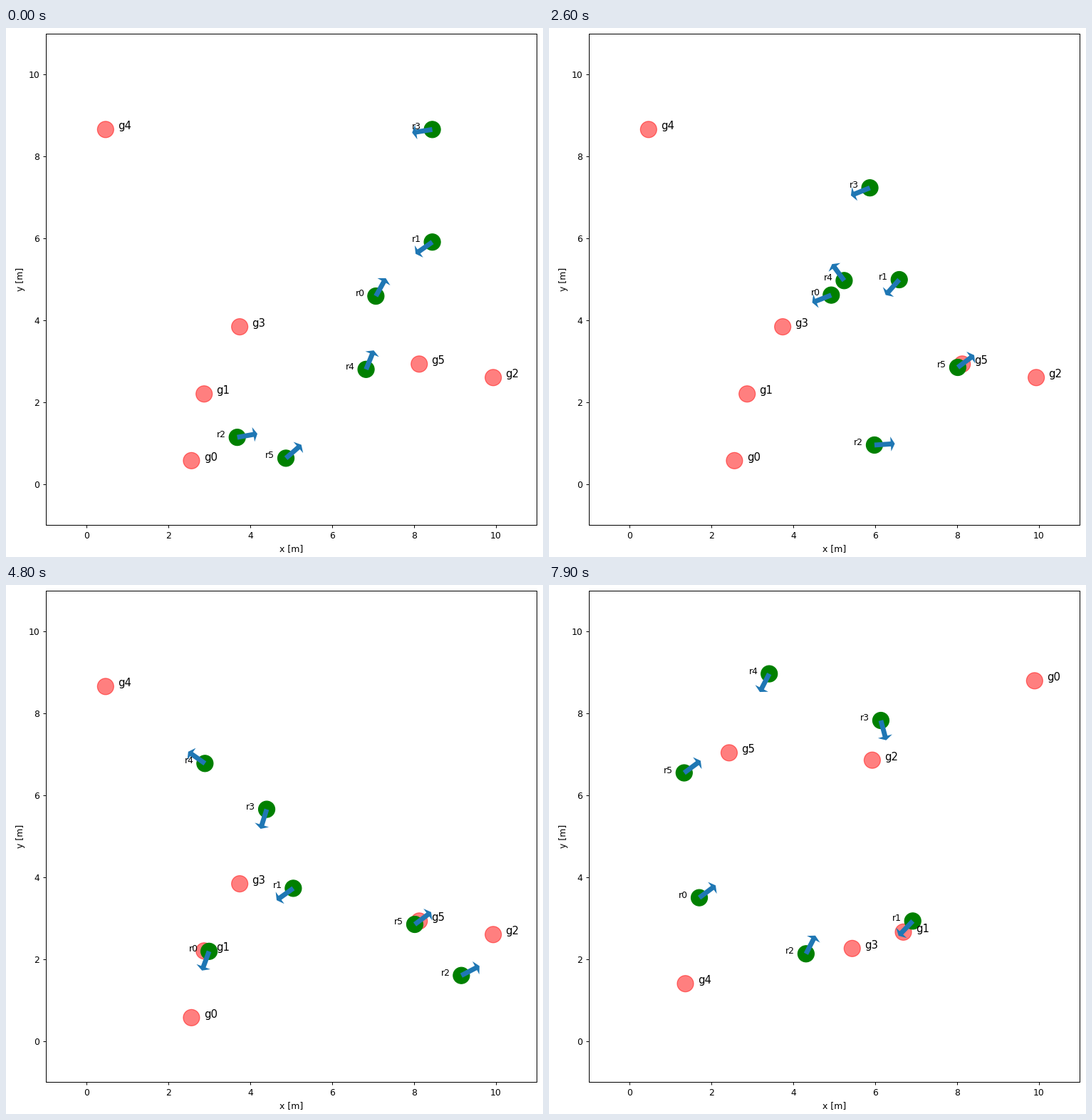
A matplotlib script for the animation above (8000 ms loop, 754 px wide and 742 px high).

```python
import numpy as np
import matplotlib.pyplot as plt
from matplotlib.animation import FuncAnimation
from matplotlib.patches import Circle, Polygon

FRAMES, RESET = 80, 69
STEP, REACH, RADIUS = 0.15, 0.2, 0.2    # metres per frame, metres, metres
W, H, DPI = 754, 742, 100
S = 0.895                               # scale of all point sizes

# Per robot: goal, first heading in degrees, then the points it passes
# at the scene's key times. From the last point it cruises to its goal.
TIMES_A = (0, 18, 35, 48, 57)
SCENE_A = [
    ((2.56, 0.57), 61, (7.07, 4.59), (5.89, 4.9), (3.83, 3.95), (2.99, 2.19)),
    ((2.87, 2.2), 215, (8.45, 5.91), (7, 5.35), (6.13, 4.52), (5.05, 3.73)),
    ((9.94, 2.6), 10, (3.68, 1.14), (4.99, 0.92), (7.27, 1.1), (9.16, 1.6),
     (10.14, 2.45)),
    ((3.74, 3.84), 189, (8.45, 8.66), (6.71, 7.6), (5.03, 6.77), (4.4, 5.66),
     (4.22, 4.45)),
    ((0.46, 8.66), 68, (6.83, 2.8), (5.74, 4.28), (4.54, 5.74), (2.89, 6.78)),
    ((8.13, 2.93), 41, (4.87, 0.63), (7.06, 2.13)),
]
TIMES_B = (70, 79)
SCENE_B = [
    ((9.9, 8.8), 45, (1.13, 2.95), (1.7, 3.5)),
    ((6.69, 2.66), 225, (7.84, 3.77), (6.92, 2.93)),
    ((5.93, 6.86), 45, (3.54, 1.05), (4.31, 2.13)),
    ((5.44, 2.26), -45, (5.33, 8.89), (6.14, 7.83)),
    ((1.36, 1.4), 225, (4.17, 9.82), (3.41, 8.97)),
    ((2.43, 7.04), 45, (0.45, 5.54), (1.33, 6.55)),
]


def unit(v):
    return v / np.hypot(*v)


def track(times, goal, heading, *points):
    """Return pose(t) -> position, direction on a smooth path to the goal."""
    p = np.array(points)
    t = np.array(times[:len(p)], float)
    to_goal = np.array(goal) - p[-1]
    steps = np.ceil((np.hypot(*to_goal) - REACH) / STEP)
    p = np.vstack([p, p[-1] + unit(to_goal) * steps * STEP])
    t = np.append(t, t[-1] + steps)

    chord = np.diff(p, axis=0) / np.diff(t)[:, None]
    a = np.radians(heading)
    start = np.hypot(*chord[0]) * np.array([np.cos(a), np.sin(a)])
    vel = np.vstack([start, (chord[:-1] + chord[1:]) / 2, chord[-1]])

    def pose(now):
        if now <= t[0]:
            return p[0] + vel[0] * (now - t[0]), unit(vel[0])
        now = min(now, t[-1])
        i = np.searchsorted(t, now) - 1
        span = t[i + 1] - t[i]
        s = (now - t[i]) / span
        u, v, c = vel[i], vel[i + 1], chord[i]
        pos = p[i] + span * (c * s * s * (3 - 2 * s) + u * s * (1 - s) ** 2
                             - v * s * s * (1 - s))
        rate = (6 * s * (1 - s) * c + u * (1 - s) * (1 - 3 * s)
                + v * s * (3 * s - 2))
        return pos, unit(rate)

    return pose


ARROW = np.array([(0, .1), (0, -.1), (.8, -.1), (.8, -.3),
                  (1, 0), (.8, .3), (.8, .1)]) * (0.5, 0.6)


def arrow_xy(pos, d):
    return pos + ARROW @ np.array([d, (-d[1], d[0])])


tracks_a = [track(TIMES_A, *robot) for robot in SCENE_A]
tracks_b = [track(TIMES_B, *robot) for robot in SCENE_B]

plt.rcParams.update({"font.size": 10 * S, "axes.linewidth": 0.8 * S,
                     "axes.labelpad": 4 * S, "patch.linewidth": S})
for tick in ("xtick.major.", "ytick.major."):
    plt.rcParams.update({tick + "size": 3.5 * S, tick + "pad": 3.5 * S,
                         tick + "width": 0.8 * S})

fig = plt.figure(figsize=(W / DPI, H / DPI), dpi=DPI, facecolor="white")
ax = fig.add_axes([56 / W, 45 / H, 689 / W, 689 / H])
ax.set(xlim=(-1, 11), ylim=(-1, 11), xlabel="x [m]", ylabel="y [m]",
       xticks=range(0, 11, 2), yticks=range(0, 11, 2))

goals = [ax.add_patch(Circle((0, 0), RADIUS, color="red", alpha=0.5))
         for _ in range(6)]
robots = [ax.add_patch(Circle((0, 0), RADIUS, color="g")) for _ in range(6)]
arrows = [ax.add_patch(Polygon(ARROW, facecolor="C0", edgecolor="none"))
          for _ in range(6)]
goal_names = [ax.text(0, 0, f"g{i}", fontsize=12 * S) for i in range(6)]
robot_names = [ax.text(0, 0, f"r{i}") for i in range(6)]


def draw(k):
    scene, tracks = (SCENE_A, tracks_a) if k < RESET else (SCENE_B, tracks_b)
    for i, pose in enumerate(tracks):
        gx, gy = scene[i][0]
        goals[i].center = gx, gy
        goal_names[i].set_position((gx + 0.3, gy))
        pos, d = pose(k)
        robots[i].center = tuple(pos)
        robot_names[i].set_position((pos[0] - 0.5, pos[1]))
        arrows[i].set_xy(arrow_xy(pos, d))
    return goals + robots + arrows + goal_names + robot_names


anim = FuncAnimation(fig, draw, frames=FRAMES, interval=100,
                     repeat=True, repeat_delay=0, blit=False)
plt.show()
```
